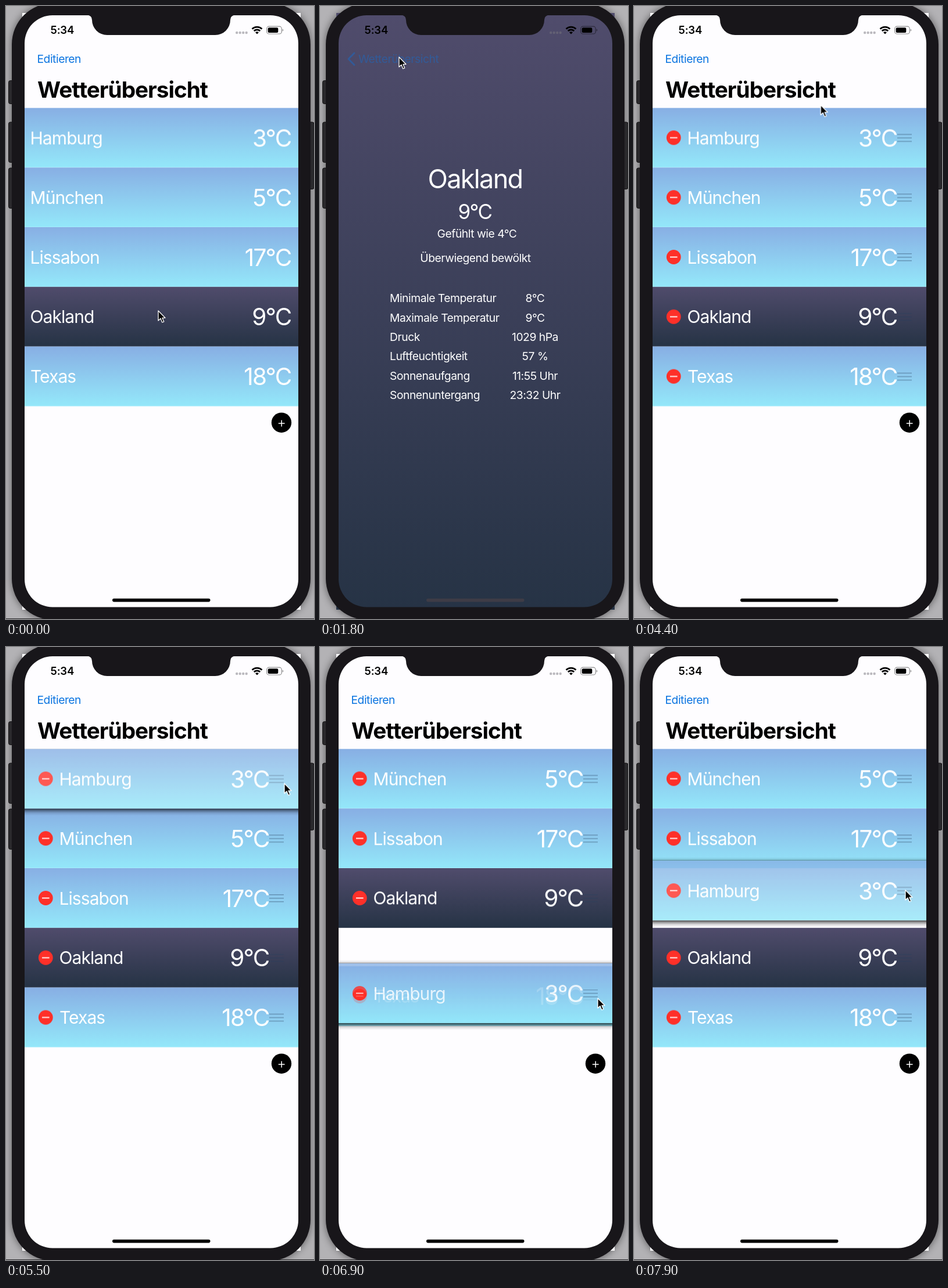
These frames come from a looping animation (530 px wide and 1056 px high, 8000 ms). An HTML page:

```html
<!DOCTYPE html>
<html lang="de">
<head>
<meta charset="utf-8">
<title>Wetter</title>
<style>
html, body { margin: 0; width: 100%; height: 100%; overflow: hidden; background: #aeadb0; }
svg { display: block; width: 530px; height: 1056px; }
text { font-family: Inter, "Open Sans", sans-serif; font-size: 19.3px; letter-spacing: -.025em; }
.name { font-size: 30px; letter-spacing: -.031em; fill: #fff; }
.temp { font-size: 40.5px; letter-spacing: -.045em; fill: #fff; text-anchor: end; }
.title { font-size: 38.7px; font-weight: 700; letter-spacing: -.026em; }
.clock { font-size: 18.5px; font-weight: 600; letter-spacing: -.01em; }
.link { fill: #0a74e0; }
.facts text { fill: #fff; }
.mid { text-anchor: middle; }
.city { font-size: 45px; letter-spacing: -.037em; }
.now { font-size: 35px; letter-spacing: -.045em; }

.list, .detail, .bar, .back, .home, .name, .temp, .minus, .grip,
.lift, .body, .shade, .munich, .lisbon, .oakland, .texas, .cursor {
  animation: 8s ease-in-out infinite;
}

/* page change: forward 250-750 ms, back 1850-2400 ms */
.list { animation-name: list; }
.detail { animation-name: detail; }
.bar { animation-name: bar; }
.back { animation-name: back; }
.home { animation-name: home; }
@keyframes list {
  0%, 3.125% { transform: none; animation-timing-function: cubic-bezier(.25,.7,.2,1); }
  9.375%, 23.125% { transform: translateX(-141px); animation-timing-function: cubic-bezier(.25,.7,.2,1); }
  30%, 100% { transform: none; }
}
@keyframes detail {
  0%, 3.125% { transform: translateX(480px); animation-timing-function: cubic-bezier(.25,.7,.2,1); }
  9.375%, 23.125% { transform: none; animation-timing-function: cubic-bezier(.25,.7,.2,1); }
  30%, 100% { transform: translateX(480px); }
}
@keyframes bar {
  0%, 3.125% { transform: none; opacity: 1; }
  7%, 24.5% { transform: translateX(-60px); opacity: 0; }
  30%, 100% { transform: none; opacity: 1; }
}
@keyframes back {
  0%, 4.5% { transform: translateX(40px); opacity: 0; }
  9.375%, 20.6% { transform: none; opacity: 1; }
  21.8%, 23.125% { transform: none; opacity: .4; }
  26.5%, 100% { transform: translateX(40px); opacity: 0; }
}
@keyframes home {
  0%, 9% { fill: #000; }
  14%, 25% { fill: #3e3c46; }
  31%, 100% { fill: #000; }
}

/* edit mode: 3300-3650 ms */
.name { animation-name: name; }
.temp { animation-name: temp; }
.minus { animation-name: minus; }
.grip { animation-name: grip; }
@keyframes name { 0%, 41.25% { transform: none; } 45.6%, 100% { transform: translateX(50px); } }
@keyframes temp { 0%, 41.25% { transform: none; } 45.6%, 100% { transform: translateX(-38px); } }
@keyframes minus {
  0%, 41.25% { transform: translateX(-50px); opacity: 0; }
  45.6%, 100% { transform: none; opacity: 1; }
}
@keyframes grip {
  0%, 41.25% { transform: translateX(40px); opacity: 0; }
  45.6%, 100% { transform: none; opacity: 1; }
}

/* dragging the first row, the others give way */
.lift { animation-name: lift; animation-timing-function: linear; }
.body { animation-name: body; }
.shade { animation-name: shade; }
.munich { animation-name: munich; }
.lisbon { animation-name: lisbon; }
.oakland { animation-name: oakland; }
.texas { animation-name: texas; }
@keyframes lift {
  0%, 68.75% { transform: none; }
  71.25% { transform: translateY(22px); }
  76.25% { transform: translateY(137px); }
  81.25% { transform: translateY(261px); }
  86.25% { transform: translateY(369.5px); }
  88.75% { transform: translateY(390px); }
  90.625% { transform: translateY(378px); }
  95.625% { transform: translateY(256px); }
  98.75% { transform: translateY(193px); }
  100% { transform: translateY(170px); }
}
@keyframes body { 0%, 65% { opacity: 1; } 67.5%, 100% { opacity: .8; } }
@keyframes shade { 0%, 65% { opacity: 0; } 67.5%, 100% { opacity: 1; } }
@keyframes munich { 0%, 72.3% { transform: none; } 75.3%, 100% { transform: translateY(-102.8px); } }
@keyframes lisbon { 0%, 76.8% { transform: none; } 79.8%, 100% { transform: translateY(-102.8px); } }
@keyframes oakland {
  0%, 80.8% { transform: none; }
  83.8%, 95.6% { transform: translateY(-102.8px); }
  98.5%, 100% { transform: none; }
}
@keyframes texas {
  0%, 85.1% { transform: none; }
  87.9%, 91.8% { transform: translateY(-102.8px); }
  94.8%, 100% { transform: none; }
}

.cursor { animation-name: cursor; }
@keyframes cursor {
  0%, 10% { transform: translate(262px, 525px); }
  20%, 24% { transform: translate(136px, 88px); }
  37.5%, 46% { transform: translate(104px, 82px); }
  62.5%, 68.75% { transform: translate(479px, 235px); animation-timing-function: linear; }
  71.25% { transform: translate(480px, 261px); animation-timing-function: linear; }
  76.25% { transform: translate(482px, 378px); animation-timing-function: linear; }
  81.25% { transform: translate(481px, 501px); animation-timing-function: linear; }
  86.25% { transform: translate(478px, 605px); animation-timing-function: linear; }
  88.75% { transform: translate(476px, 626px); animation-timing-function: linear; }
  90.625% { transform: translate(474px, 608px); animation-timing-function: linear; }
  95.625% { transform: translate(469px, 483px); animation-timing-function: linear; }
  98.75% { transform: translate(467px, 419px); animation-timing-function: linear; }
  100% { transform: translate(466px, 396px); }
}
</style>
</head>
<body>
<svg viewBox="0 0 530 1056">
  <defs>
    <linearGradient id="day" x2="0" y2="1">
      <stop stop-color="#88afe4"/><stop offset="1" stop-color="#94e8fa"/>
    </linearGradient>
    <linearGradient id="night" x2="0" y2="1">
      <stop stop-color="#504c6c"/><stop offset="1" stop-color="#263345"/>
    </linearGradient>
    <linearGradient id="below" x2="0" y2="1">
      <stop stop-opacity=".75"/><stop offset=".25" stop-opacity=".42"/>
      <stop offset=".6" stop-opacity=".13"/><stop offset="1" stop-opacity="0"/>
    </linearGradient>
    <linearGradient id="above" x2="0" y2="1">
      <stop stop-opacity="0"/><stop offset=".7" stop-opacity=".12"/><stop offset="1" stop-opacity=".45"/>
    </linearGradient>
    <filter id="blur" x="-10%" width="120%"><feGaussianBlur stdDeviation="7"/></filter>
    <clipPath id="glass"><rect x="28" y="12" width="479" height="1028"/></clipPath>
    <rect id="tile" x="28" width="479" height="102.8"/>
    <g id="stop">
      <circle cx="68.3" cy="51.5" r="12.4" fill="#fe3029"/>
      <path d="M62 51.5h12.6" stroke="#fff" stroke-width="1.8"/>
    </g>
    <path id="bars" d="M453 45.7h25M453 51.7h25M453 57.7h25" stroke="#28405f" stroke-opacity=".4" stroke-width="1.4"/>
  </defs>

  <rect width="530" height="1056" fill="#b3b2b5"/>
  <rect x="10" y="-5" width="514" height="1063" rx="71" opacity=".5" filter="url(#blur)"/>
  <g fill="#2a292c" stroke="#121113">
    <rect x="4.5" y="128.5" width="12" height="40" rx="3"/>
    <rect x="4.5" y="200" width="12" height="69.5" rx="3"/>
    <rect x="4.5" y="279" width="12" height="69.5" rx="3"/>
    <rect x="518" y="200" width="12" height="115.5" rx="3"/>
  </g>
  <rect y="1055" width="530" height="1" fill="#2b2a2d"/>

  <g clip-path="url(#glass)">
    <g class="list">
      <rect x="28" y="12" width="479" height="1028" fill="#fefdff"/>
      <circle cx="474" cy="717.7" r="17.2"/>
      <path d="M468.8 719h10.8M474.2 713.6v10.8" stroke="#fff" stroke-width="1.5"/>

      <g transform="translate(0 278.2)"><g class="munich">
        <use href="#tile" fill="url(#day)"/>
        <use href="#stop" class="minus"/><use href="#bars" class="grip"/>
        <text class="name" x="41.5" y="62.5">München</text>
        <text class="temp" x="490.5" y="66.5">5°C</text>
      </g></g>
      <g transform="translate(0 381)"><g class="lisbon">
        <use href="#tile" fill="url(#day)"/>
        <use href="#stop" class="minus"/><use href="#bars" class="grip"/>
        <text class="name" x="41.5" y="62.5">Lissabon</text>
        <text class="temp" x="490.5" y="66.5">17°C</text>
      </g></g>
      <g transform="translate(0 483.8)"><g class="oakland">
        <use href="#tile" fill="url(#night)"/>
        <use href="#stop" class="minus"/><use href="#bars" class="grip"/>
        <text class="name" x="41.5" y="62.5">Oakland</text>
        <text class="temp" x="490.5" y="66.5">9°C</text>
      </g></g>
      <g transform="translate(0 586.6)"><g class="texas">
        <use href="#tile" fill="url(#day)"/>
        <use href="#stop" class="minus"/><use href="#bars" class="grip"/>
        <text class="name" x="42" y="62.5">Texas</text>
        <text class="temp" x="490.5" y="66.5">18°C</text>
      </g></g>
      <g transform="translate(0 175.4)"><g class="lift">
        <g class="shade">
          <rect x="28" y="-6" width="479" height="6" fill="url(#above)"/>
          <rect x="28" y="102.8" width="479" height="12" fill="url(#below)"/>
        </g>
        <g class="body">
          <use href="#tile" fill="url(#day)"/>
          <use href="#stop" class="minus"/><use href="#bars" class="grip"/>
          <text class="name" x="41.5" y="62.5">Hamburg</text>
          <text class="temp" x="490.5" y="66.5">3°C</text>
        </g>
      </g></g>
      <rect x="28" y="12" width="479" height="163.4" fill="#fefdff"/>
    </g>

    <g class="detail">
      <rect x="28" y="12" width="479" height="1028" fill="url(#night)"/>
      <g class="facts">
        <text class="mid city" x="267" y="314">Oakland</text>
        <text class="mid now" x="266.5" y="367">9°C</text>
        <text class="mid" x="270" y="399">Gefühlt wie 4°C</text>
        <text class="mid" x="267.5" y="441">Überwiegend bewölkt</text>
        <text x="120" y="510">Minimale Temperatur</text><text class="mid" x="370" y="510">8°C</text>
        <text x="120" y="543.5">Maximale Temperatur</text><text class="mid" x="370" y="543.5">9°C</text>
        <text x="120" y="577">Druck</text><text class="mid" x="370" y="577">1029 hPa</text>
        <text x="120" y="610">Luftfeuchtigkeit</text><text class="mid" x="370" y="610">57 %</text>
        <text x="120" y="643.5">Sonnenaufgang</text><text class="mid" x="370" y="643.5">11:55 Uhr</text>
        <text x="120" y="677">Sonnenuntergang</text><text class="mid" x="370" y="677">23:32 Uhr</text>
      </g>
    </g>

    <g class="bar">
      <text class="link" x="53.5" y="98">Editieren</text>
      <text class="title" x="54" y="157.5">Wetterübersicht</text>
    </g>
    <g class="back">
      <path d="M59 81L49 91.3L59 101.6" fill="none" stroke="#0a74e0" stroke-width="2.8" stroke-linecap="round" stroke-linejoin="round"/>
      <text class="link" x="66" y="98">Wetterübersicht</text>
    </g>

    <text class="clock" x="76.5" y="48">5:34</text>
    <g fill="#77757d" fill-opacity=".5">
      <circle cx="397.2" cy="46" r="2.2"/><circle cx="402.7" cy="46" r="2.2"/>
      <circle cx="408.2" cy="46" r="2.2"/><circle cx="413.7" cy="46" r="2.2"/>
    </g>
    <path d="M423.5 39.5a12.3 12.3 0 0 1 17 0M426.7 43a7.7 7.7 0 0 1 10.6 0" fill="none" stroke="#000" stroke-width="2.7"/>
    <path d="M432 48.5l-2.9-3a4 4 0 0 1 5.8 0z"/>
    <rect x="448.7" y="35.2" width="25.6" height="12.8" rx="3.8" fill="none" stroke="#000" stroke-opacity=".45" stroke-width="1.2"/>
    <rect x="450.7" y="37.2" width="17.6" height="8.8" rx="2"/>
    <path d="M475.8 39.5a2.3 2.3 0 0 1 0 4.2z" fill-opacity=".5"/>
    <rect class="home" x="183" y="1020.8" width="168.5" height="5.6" rx="2.8"/>
  </g>

  <!-- bezel with the screen cut out, then the notch -->
  <g fill="#18161a">
    <path fill-rule="evenodd" d="M81 -5H453A71 71 0 0 1 524 66V986.5A71 71 0 0 1 453 1057.5H81A71 71 0 0 1 10 986.5V66A71 71 0 0 1 81 -5Z
      M80 16H455A48 48 0 0 1 503 64V987.5A48 48 0 0 1 455 1035.5H80A48 48 0 0 1 32 987.5V64A48 48 0 0 1 80 16Z"/>
    <path d="M139 15.5Q148 16 148 24A26 26 0 0 0 174 50H360A26 26 0 0 0 386 24Q386 16 395 15.5Z"/>
  </g>
  <path class="cursor" d="M0 0V17L4 13.3L6.8 20L9.7 18.8L6.9 12.3H12Z" stroke="#fff" stroke-width="1.3" stroke-linejoin="round"/>
</svg>
</body>
</html>
```
